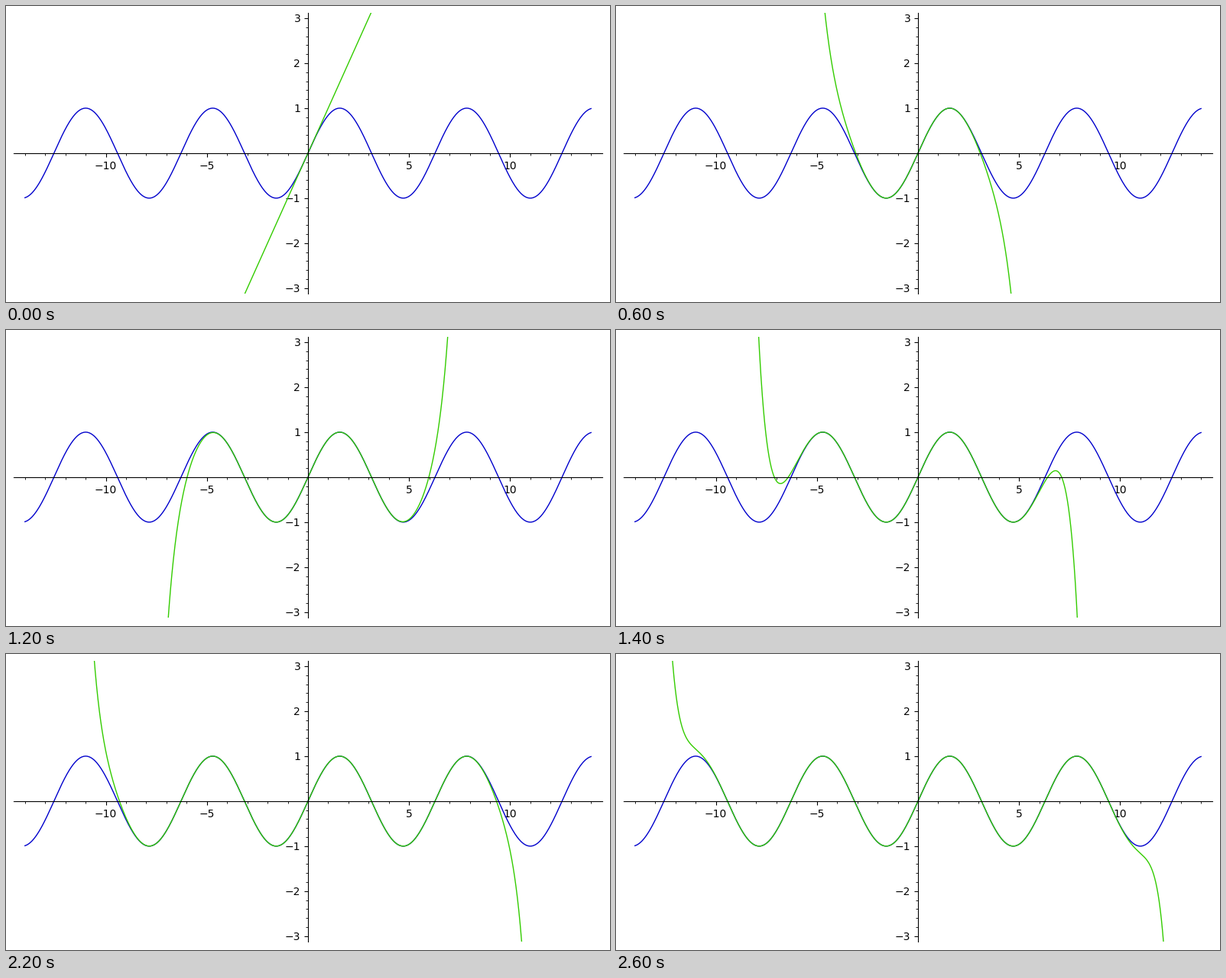
A matplotlib script that plays this animation: 790x388 px, repeating every 2.8 s.

```python
import math

import numpy as np
import matplotlib.pyplot as plt
from matplotlib.animation import FuncAnimation
from matplotlib.ticker import MultipleLocator

W, H, DPI = 790, 388, 100
FRAMES, INTERVAL = 14, 200
BLUE, GREEN = "#0000cc", "#33cc00"
X_MAX, Y_MAX, MARGIN = 14, 3, 1.04

plt.rcParams["font.family"] = "DejaVu Sans"
plt.rcParams["font.size"] = 10


def taylor_sin(x, terms):
    """Partial sum of the sine series with the given number of terms."""
    return sum((-1) ** k * x ** (2 * k + 1) / math.factorial(2 * k + 1)
               for k in range(terms))


fig = plt.figure(figsize=(W / DPI, H / DPI), dpi=DPI, facecolor="white")
# Plot area in pixels: left, bottom, width, height
ax = fig.add_axes([9.97 / W, 11.12 / H, 770 / W, 368 / H])
ax.set_xlim(-X_MAX * MARGIN, X_MAX * MARGIN)
ax.set_ylim(-Y_MAX * MARGIN, Y_MAX * MARGIN)

for side in ("left", "bottom"):
    ax.spines[side].set_position(("data", 0))
for side in ("right", "top"):
    ax.spines[side].set_visible(False)

ax.set_xticks([-10, -5, 5, 10])
ax.set_yticks([-3, -2, -1, 1, 2, 3])
ax.xaxis.set_minor_locator(MultipleLocator(1))
ax.yaxis.set_minor_locator(MultipleLocator(0.2))

x = np.linspace(-X_MAX, X_MAX, 2001)
ax.plot(x, np.sin(x), color=BLUE, lw=1)
approx, = ax.plot([], [], color=GREEN, lw=1)


def update(frame):
    approx.set_data(x, taylor_sin(x, frame + 1))
    return approx,


anim = FuncAnimation(fig, update, frames=FRAMES, interval=INTERVAL,
                     repeat=True, repeat_delay=0)
plt.show()
```
